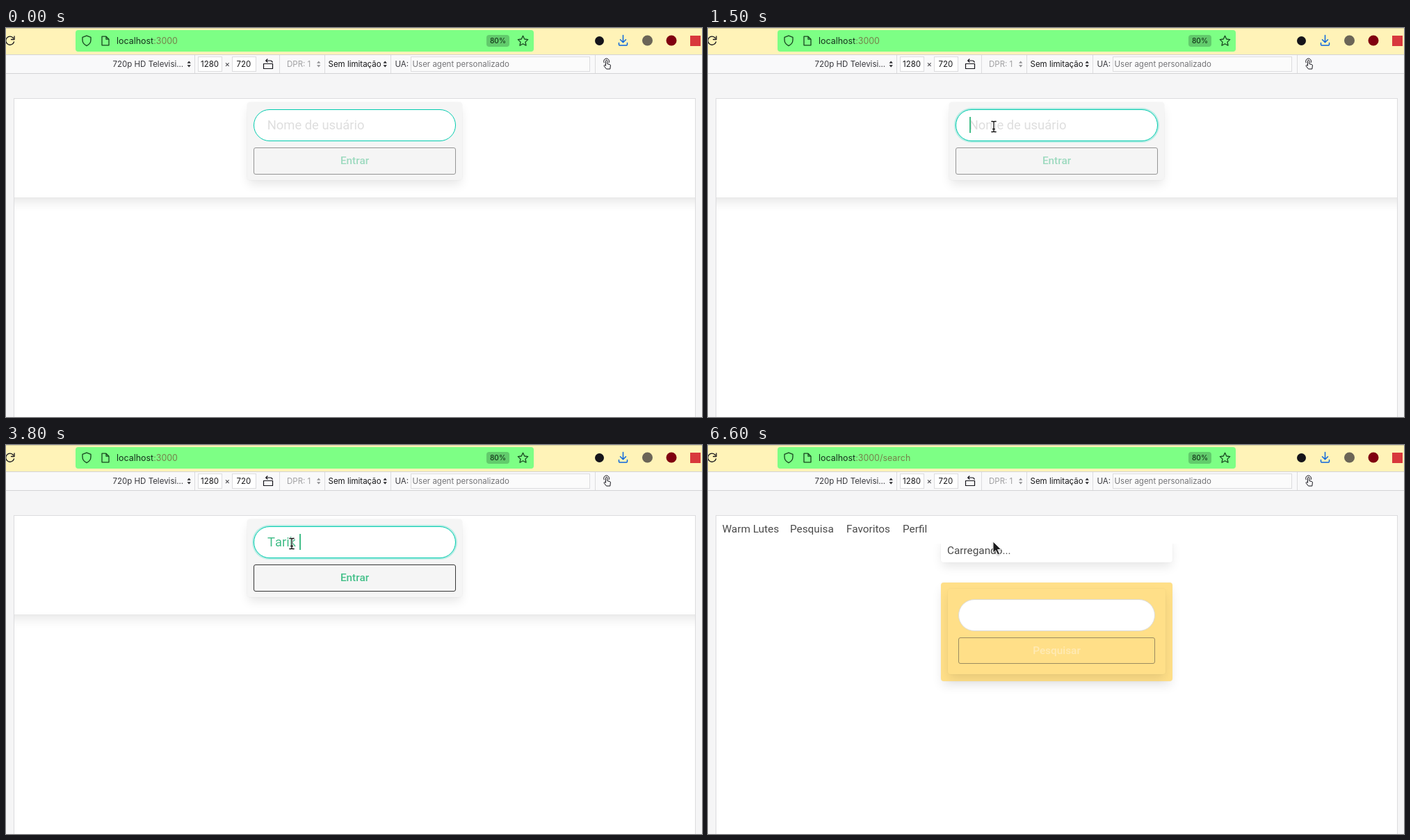
An HTML page that plays this animation: 1001x560 px, repeating every 8000 ms.

```html
<!DOCTYPE html>
<html lang="pt">
<head>
<meta charset="utf-8">
<title>Login</title>
<style>
  html, body { margin: 0; width: 100%; height: 100%; overflow: hidden; }
  body { position: relative; background: #f5f5f6; font: 15.33px/20px Roboto, sans-serif; color: #4a4a4a; }
  body * { box-sizing: border-box; }
  .t, .scene, .scene > div, .ui > div, .icons { position: absolute; }
  .t { white-space: pre; line-height: 20px; }
  .icons { left: 0; top: 0; overflow: visible; }

  /* browser chrome */
  .ui { font: 11.5px/20px Inter, sans-serif; color: #18181a; }
  .bar { left: 0; top: 0; width: 1001px; height: 38px; background: #fff3b8; border-top: 1px solid #d8cf9f; }
  .url { left: 100px; top: 3px; width: 659px; height: 31px; border-radius: 4px; background: #7dff85; }
  .zoom { left: 691px; top: 10px; width: 33px; height: 17px; border-radius: 4px; background: #62cb6c;
    font-size: 10.2px; font-weight: 500; line-height: 17px; text-align: center; color: #14361a; }
  .tools { left: 0; top: 38px; width: 1001px; height: 28px; background: #f9f9fa;
    border: solid #d3d3d5; border-width: 1px 0; }
  .sep { top: 39px; width: 1px; height: 26px; background: #dcdcde; }
  .field { top: 41px; height: 22px; border: 1px solid #dcdcde; background: #fff; }
  .page { left: 11px; top: 101px; width: 981px; height: 470px; border: 1px solid #dcdcde; background: #fff; }
  .addr { font-size: 12.45px; color: #15301c; }
  .addr span { color: #75804a; }
  .path { animation: search 8s step-end infinite; }

  /* page */
  .scene { inset: 0; clip-path: inset(102px 10px 0 12px); }
  .head { left: -20px; top: 90px; width: 1041px; background: #fff; }
  .box, .head { box-shadow: 0 7.7px 15.3px -1.9px rgba(10,10,10,.1), 0 0 0 1px rgba(10,10,10,.02); }
  .box { border-radius: 4px; background: #fff; }
  .input { border-radius: 23px; border: 1px solid #00cbad; background: #fff; }
  .button { border-radius: 3px; border: 1px solid #363636; text-align: center; font-weight: 500; }
  .grey { background: #f5f5f5; }
  .gold { background: #ffdf88; }

  .login { animation: login 8s step-end infinite; }
  .loading { animation: loading 8s step-end infinite; }
  .search { animation: search 8s step-end infinite; }
  @keyframes login { 0% { opacity: 1 } 65%, 100% { opacity: 0 } }
  @keyframes loading { 0% { opacity: 0 } 65% { opacity: 1 } 82.5%, 100% { opacity: 0 } }
  @keyframes search { 0% { opacity: 0 } 82.5%, 100% { opacity: 1 } }

  .user { left: 356px; top: 117px; width: 291px; height: 46px;
    animation: focus 8s step-end infinite; }
  @keyframes focus {
    0% { box-shadow: none }
    12.5%, 100% { box-shadow: 0 0 0 2px rgba(0,209,178,.25) }
  }
  .hint { left: 375.7px; top: 130px; font-size: 18.4px; color: #dedede;
    animation: hint 8s step-end infinite; }
  @keyframes hint { 0% { opacity: 1 } 31.25%, 100% { opacity: 0 } }

  .enter { left: 356px; top: 172px; width: 291px; height: 39px; line-height: 37px; color: #45c08a;
    animation: enable 8s step-end infinite; }
  @keyframes enable { 0% { opacity: .5 } 35%, 100% { opacity: 1 } }

  /* each piece of text shows from its own moment until the form is gone */
  .typed { left: 375.9px; top: 128px; height: 23px; display: flex; align-items: center;
    white-space: pre; line-height: 23px; color: #42bd88; }
  .typed i { font-style: normal; font-size: 0; animation: type 8s var(--at) step-end infinite; }
  @keyframes type { 0% { font-size: 18.4px } 35%, 100% { font-size: 0 } }
  .caret { width: 2px; height: 23px; background: currentColor; opacity: 0;
    animation: caret 8s step-end infinite; }
  @keyframes caret {
    0%, 27.5% { opacity: 0 }
    12.5%, 31.25% { opacity: 1 }
    57.5%, 100% { opacity: 0 }
  }

  /* pointer */
  .pointer { animation: move 8s step-end infinite; }
  @keyframes move {
    0% { transform: translate(323px, 70px); opacity: 0 }
    5% { transform: translate(323px, 70px); opacity: 1 }
    6.25% { transform: translate(352px, 94px); opacity: 1 }
    7.5% { transform: translate(373px, 111px); opacity: 1 }
    8.75% { transform: translate(390px, 125px); opacity: 1 }
    10% { transform: translate(401px, 134px); opacity: 1 }
    11.25% { transform: translate(406px, 138px); opacity: 1 }
    18.75%, 100% { transform: translate(411px, 142px); opacity: 1 }
  }
  .arrow { filter: drop-shadow(.5px 1px 1px rgba(0,0,0,.3)); animation: arrow 8s step-end infinite; }
  .beam { animation: beam 8s step-end infinite; }
  @keyframes arrow { 0% { opacity: 1 } 8.75% { opacity: 0 } 65%, 100% { opacity: 1 } }
  @keyframes beam { 0% { opacity: 0 } 8.75% { opacity: 1 } 65%, 100% { opacity: 0 } }
</style>
</head>
<body>

<div class="ui">
  <div class="bar"></div>
  <div class="url"></div>
  <div class="t addr" style="left:159px;top:8.5px">localhost<span>:3000</span><span class="path">/search</span></div>
  <div class="zoom">80%</div>

  <div class="tools"></div>
  <div class="sep" style="left:271px"></div>
  <div class="sep" style="left:393px"></div>
  <div class="sep" style="left:458px"></div>
  <div class="sep" style="left:553px"></div>
  <div class="sep" style="left:847px"></div>
  <div class="field" style="left:276px;width:35px"></div>
  <div class="field" style="left:325px;width:35px"></div>
  <div class="field" style="left:582px;width:258px;background:#fbfbfb"></div>
  <div class="t" style="left:153.5px;top:42px;color:#38383d">720p HD Televisi...</div>
  <div class="t" style="left:280px;top:42px">1280</div>
  <div class="t" style="left:314.5px;top:42px;color:#38383d">×</div>
  <div class="t" style="left:331.5px;top:42px">720</div>
  <div class="t" style="left:404px;top:42px;color:#a0a0a2">DPR: 1</div>
  <div class="t" style="left:463.5px;top:42px">Sem limitação</div>
  <div class="t" style="left:559.5px;top:42px;color:#38383d">UA:</div>
  <div class="t" style="left:584.5px;top:42px;color:#757578">User agent personalizado</div>
  <div class="page"></div>

  <svg class="icons" width="1001" height="560" fill="none" stroke="#15141a" stroke-width="1.3" stroke-linecap="round" stroke-linejoin="round">
    <path d="M10.5 14.5A6 6 0 1 0 11.5 20M12 12v4.5H7.5"/>
    <g stroke="#17441f">
      <path d="M116 11.2l6 2.2v3.6q0 5.8-6 8.6q-6-2.8-6-8.6v-3.6z"/>
      <path d="M138 12.2h6l4 4v8.6h-10zM144 12.2v4h4"/>
      <path d="M743.5 11.3l2.2 4.7 5 .6-3.7 3.5 1 5.1-4.5-2.5-4.5 2.5 1-5.1-3.7-3.5 5-.6z"/>
    </g>
    <path stroke="#0b66dd" stroke-width="1.5" d="M887.5 10.5v10M883.5 16.8l4 4 4-4M881.5 21.5v2.3q0 1.2 1.2 1.2h9.6q1.2 0 1.2-1.2v-2.3"/>
    <g stroke="none">
      <circle cx="853.5" cy="18.5" r="6.5" fill="#15141a"/>
      <circle cx="922.5" cy="18" r="7.5" fill="#6b6557"/>
      <circle cx="957" cy="18" r="7.5" fill="#800010"/>
      <rect x="984" y="11" width="15" height="15" fill="#d8383c"/>
    </g>
    <path id="updown" stroke="none" fill="#2a2a2e" d="M260.5 50.8l2.7-3.3 2.7 3.3zM260.5 53.2l2.7 3.3 2.7-3.3z"/>
    <use href="#updown" x="186.5" opacity=".5"/>
    <use href="#updown" x="282"/>
    <path stroke-width="1.2" d="M370.5 51.5h13v7h-13zM374 47h6q3 0 3 2.5M376 44.8l-2.3 2.2 2.3 2.2"/>
    <path stroke-width="1" d="M862.5 54v-6.5q0-1.3 1.2-1.3t1.2 1.3v4.2l3.4.8q1.2.3 1.1 1.6l-.6 4.9h-5.3l-3.3-4.2q-.5-1 .4-1.4t1.9.6M860.2 50a4 4 0 1 1 7-.3"/>
  </svg>
</div>

<div class="scene login">
  <div class="head" style="height:154px"></div>
  <div class="box grey" style="left:347px;top:107px;width:309px;height:112px"></div>
  <div class="input user"></div>
  <div class="t hint">Nome de usuário</div>
  <div class="typed"><i style="--at:2.5s">T</i><i style="--at:2.8s">ar</i><i style="--at:3.4s">i</i><i style="--at:3.5s">k</i><i style="--at:3.8s"> </i><i style="--at:4.1s">V</i><i style="--at:4.2s">i</i><i style="--at:4.3s">m</i><i style="--at:4.5s">b</i><i style="--at:4.6s">e</i><b class="caret"></b></div>
  <div class="button grey enter">Entrar</div>
</div>

<div class="scene loading">
  <div class="head" style="height:147px"></div>
  <div class="box" style="left:477px;top:97px;width:49px;height:96px"></div>
  <div class="t" style="left:485.5px;top:107.6px;line-height:19.3px">Carr<br>ega<br>ndo.<br>..</div>
</div>

<div class="scene search">
  <div class="box" style="left:335px;top:132px;width:333px;height:37px"></div>
  <div class="t" style="left:344px;top:142px">Carregando...</div>
  <div style="left:12px;top:102px;width:979px;height:40px;background:#fff"></div>
  <div class="t" style="left:20.5px;top:111px">Warm Lutes</div>
  <div class="t" style="left:118px;top:111px">Pesquisa</div>
  <div class="t" style="left:199px;top:111px">Favoritos</div>
  <div class="t" style="left:280px;top:111px">Perfil</div>
  <div class="box gold" style="left:335px;top:197.5px;width:333px;height:142.5px"></div>
  <div class="box gold" style="left:345px;top:207px;width:313px;height:123px"></div>
  <div class="input" style="left:360px;top:222px;width:283px;height:46px;border-color:#dbdbdb"></div>
  <div class="button" style="left:360px;top:277px;width:283px;height:38px;line-height:37px;border-color:#9b8b60;color:#ffeab4">Pesquisar</div>
</div>

<svg class="icons" width="1001" height="560">
  <g class="pointer">
    <path class="arrow" d="M-1-3v16.2l3.8-3.5 3 6.3 2.7-1.2-3-6.2 5-.3z" fill="#1c1c1e" stroke="#fff" stroke-width=".9"/>
    <g class="beam" fill="none" stroke="#fff" stroke-linecap="square">
      <path d="M-3-7.5h2q1 0 1 1v13q0 1-1 1h-2M3-7.5h-2q-1 0-1 1M3 7.5h-2q-1 0-1-1M-1.3 3.5h2.6" stroke-width="3"/>
      <path d="M-3-7.5h2q1 0 1 1v13q0 1-1 1h-2M3-7.5h-2q-1 0-1 1M3 7.5h-2q-1 0-1-1M-1.3 3.5h2.6" stroke="#111" stroke-width="1.3"/>
    </g>
  </g>
</svg>

</body>
</html>
```
